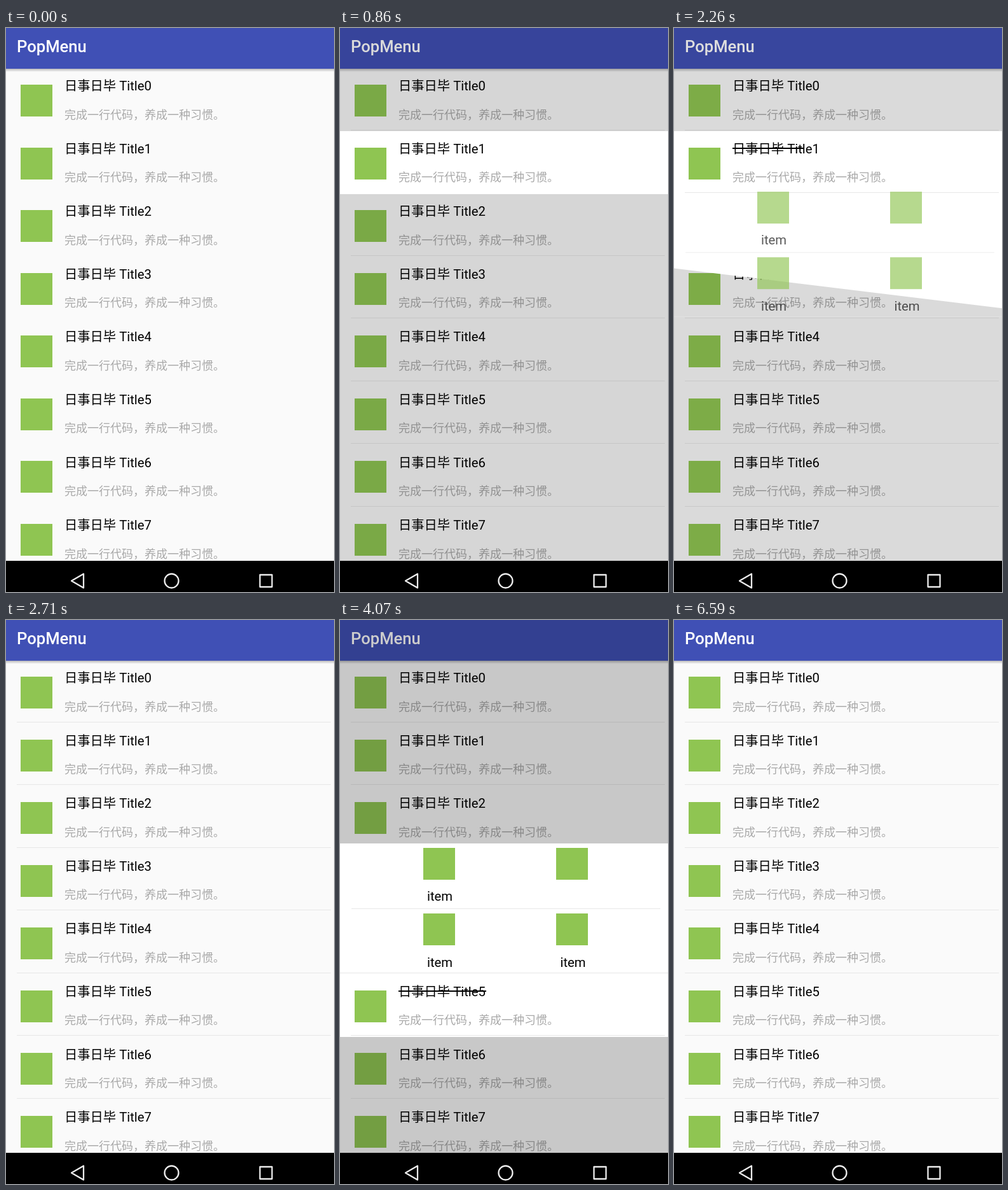
These frames come from a looping animation (516x886 px, 6.71 s). An HTML page with a canvas:

```html
<!DOCTYPE html>
<html lang="zh-CN">
<head>
<meta charset="utf-8">
<title>PopMenu</title>
<style>
  html, body { margin: 0; width: 100%; height: 100%; overflow: hidden; background: #000; }
  canvas { display: block; }
</style>
</head>
<body>
<canvas id="stage" width="516" height="886"></canvas>
<script>
const ctx = document.getElementById('stage').getContext('2d');
const W = 516, LIST_END = 837, LOOP = 6710;
const ROW_TOP = 63.4, ROW_H = 98.57, MENU_H = 204;
const FONT = 'Roboto, "Noto Sans CJK SC", "Noto Sans CJK", sans-serif';
const GREEN = '#8fc552', LINE = '#e7e7e7';

// The screen is refreshed only at these moments (ms).
const TICKS = [0, 740, 860, 1010, 1160, 1310, 1460, 1610, 2260, 2410, 2560, 2710, 2860,
  3010, 3130, 3250, 3370, 3520, 3640, 3760, 3920, 4070, 5930, 6050, 6170, 6290, 6440, 6590];
const POPUPS = [
  { row: 1, up: false, open: 700, close: 2145 },
  { row: 5, up: true, open: 2970, close: 5815 }
];
const OPEN_DELAY = 180, OPEN_TIME = 420, DIM_TIME = 220, CLOSE_TIME = 330;

const clamp = v => Math.max(0, Math.min(1, v));

function rect(x, y, w, h, color) {
  ctx.fillStyle = color;
  ctx.fillRect(x, y, w, h);
}

function text(str, x, y, size, color, weight = 400) {
  ctx.font = `${weight} ${size}px ${FONT}`;
  ctx.fillStyle = color;
  ctx.fillText(str, x, y);
}

function icon(x, y) {
  rect(x, y, 50, 50, GREEN);
}

function drawRow(i, divider) {
  const y = i * ROW_H;
  icon(23, Math.round(y + 89));
  text('日事日毕 Title' + i, 92, y + 98.2, 20.3, '#000');
  text('完成一行代码，养成一种习惯。', 92, y + 142.6, 18, '#a9a9a9');
  if (divider) rect(17, Math.round(y + 159.5), 494, 1, LINE);
}

function drawList(dividers) {
  rect(0, 0, W, LIST_END, '#fafafa');
  for (let i = 0; i < 8; i++) drawRow(i, dividers);
  rect(0, 0, W, 64, '#4050b5');
  const shadow = ctx.createLinearGradient(0, 64, 0, 69);
  shadow.addColorStop(0, 'rgba(0,0,0,.26)');
  shadow.addColorStop(1, 'rgba(0,0,0,0)');
  rect(0, 64, W, 5, shadow);
  text('PopMenu', 17, 37.5, 25.6, '#fff', 500);
}

function drawItems(top, q, up) {
  ctx.save();
  ctx.beginPath();
  ctx.rect(0, top - (up ? 0 : 12), W, MENU_H + 12);
  ctx.clip();
  ctx.globalAlpha = 1 - q;
  ctx.translate(0, top - 31 * q);
  rect(18, 102, 486, 1, LINE);
  rect(0, 203, W, 1, LINE);
  for (let r = 0; r < 2; r++) {
    for (let c = 0; c < 2; c++) {
      icon(131 + c * 209, 7 + r * 103);
      if (r || !c) text('item', 137 + c * 209.5, 90 + r * 103.5, 20.3, '#000');
    }
  }
  ctx.restore();
}

function drawPopup({ row, up, open, close }, t) {
  const closing = t >= close;
  // q: 0 when the menu is fully unfolded, 1 when folded away
  const q = closing ? clamp((t - close) / CLOSE_TIME)
                    : 1 - clamp((t - open - OPEN_DELAY) / OPEN_TIME);
  const dim = closing ? 1 - q : clamp((t - open) / DIM_TIME);
  rect(0, 0, W, LIST_END, `rgba(0,0,0,${0.2 * dim})`);

  const top = Math.round(ROW_TOP + row * ROW_H), bottom = top + 99;
  rect(0, top, W, 99, '#fff');

  const edge = up ? top - 1 : bottom, dir = up ? -1 : 1;
  const left = MENU_H * (1 - clamp(1.23 * q)), right = MENU_H * (1 - q * q);
  ctx.fillStyle = '#fff';
  ctx.beginPath();
  ctx.moveTo(0, edge - dir);
  ctx.lineTo(W, edge - dir);
  ctx.lineTo(W, edge + dir * right);
  ctx.lineTo(0, edge + dir * left);
  ctx.fill();

  drawRow(row, q < 1);
  rect(92, Math.round(row * ROW_H + 89.5), 138 * (1 - q ** 1.6), 2, '#000');
  drawItems(up ? edge - MENU_H : edge, q, up);
}

function drawNav() {
  rect(0, LIST_END, W, 886 - LIST_END, '#000');
  ctx.strokeStyle = '#ececec';
  ctx.lineWidth = 2.3;
  ctx.lineJoin = 'round';
  ctx.beginPath();
  ctx.moveTo(103, 868.5);
  ctx.lineTo(122, 857.5);
  ctx.lineTo(122, 879.5);
  ctx.closePath();
  ctx.moveTo(271.5, 868.5);
  ctx.arc(260.5, 868.5, 11, 0, 2 * Math.PI);
  ctx.rect(399.5, 859, 19, 19);
  ctx.stroke();
}

function frame() {
  const now = performance.now() % LOOP;
  const t = TICKS.findLast(tick => tick <= now);
  drawList(t >= 740);
  const popup = POPUPS.find(p => t >= p.open && t < p.close + CLOSE_TIME);
  if (popup) drawPopup(popup, t);
  drawNav();
  requestAnimationFrame(frame);
}
frame();
</script>
</body>
</html>
```
